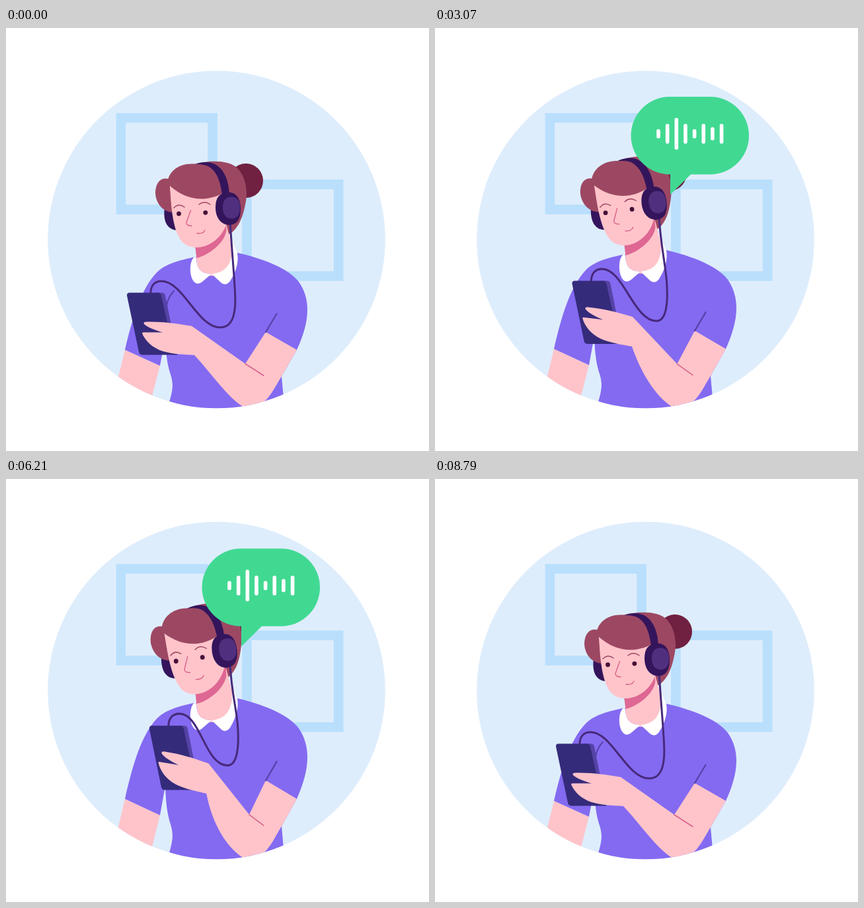
Animation of 640 by 640 pixels, one loop 9 s. Source, as an HTML page with a canvas:

```html
<!DOCTYPE html>
<html lang="en">
<head>
<meta charset="utf-8">
<title>Listening to a voice message</title>
<style>
  html, body { margin: 0; width: 100%; height: 100%; overflow: hidden; background: #fff; }
  canvas { display: block; width: 100vw; height: 100vh; }
</style>
</head>
<body>
<canvas id="stage" width="640" height="640"></canvas>
<script>
const ctx = document.getElementById('stage').getContext('2d');
const LOOP = 9000, FPS = 14, FLOOR = 574;

const C = {
  disc: '#deedfc', frame: '#b9dffd', hair: '#9d4863', bun: '#702040',
  band: '#34155c', cup: '#50307e', skin: '#ffc4ca', shade: '#de6793',
  shirt: '#846af1', fold: '#5a42ab', phone: '#352b7b', edge: '#5643a6',
  cable: '#47297b', line: '#d9608a', eye: '#451038', bubble: '#41d992'
};

// time, body lift, arm lift, cable x, head x, head y, head tilt, bubble top
const POSE = [
  [0,    0,   0,   324,  0,    0,    0,    94],
  [1710, 1,   1,   333, -4.5, -8.2, -6.6,  98],
  [3070, .45, .72, 335, -3.6, -3.2, -5,   104],
  [4500, 0,   .5,  335, -2.6,  1.3, -3,   109.5],
  [6210, .9,  1,   335, -4.4, -7.5, -5.7, 105],
  [7290, .55, .66, 328, -2.7, -5.7, -4,    99],
  [8400, 0,   0,   324,  0,    0,    0,    94.5]
];
const POP = [
  [400, 0], [965, 1.15], [1300, .97], [1710, .994], [2000, 1],
  [7650, 1], [8070, 1.085], [8360, .905], [8790, 0]
];

// full bar heights, and the moments a dip reaches the first bar
const BARS = [14, 30, 48, 30, 14, 30, 20, 30];
const DIPS = [1438, 4180, 6730];
const LAG = 80;

// smooth interpolation through the keys without overshoot
function track(keys, c, t) {
  const n = keys.length - 1;
  if (t <= keys[0][0]) return keys[0][c];
  if (t >= keys[n][0]) return keys[n][c];
  let i = 0;
  while (t >= keys[i + 1][0]) i++;
  const rise = j => (keys[j + 1][c] - keys[j][c]) / (keys[j + 1][0] - keys[j][0]);
  const slope = j => {
    if (j === 0 || j === n) return 0;
    const a = rise(j - 1), b = rise(j);
    return a * b > 0 ? 2 * a * b / (a + b) : 0;
  };
  const h = keys[i + 1][0] - keys[i][0], u = (t - keys[i][0]) / h;
  const w = u * u * (3 - 2 * u);
  return keys[i][c] * (1 - w) + keys[i + 1][c] * w +
    h * u * (1 - u) * (slope(i) * (1 - u) - slope(i + 1) * u);
}

function fill(d, color) {
  ctx.fillStyle = color;
  ctx.fill(new Path2D(d));
}

function stroke(d, color, width) {
  ctx.strokeStyle = color;
  ctx.lineWidth = width;
  ctx.lineCap = ctx.lineJoin = 'round';
  ctx.stroke(new Path2D(d));
}

function dot(x, y, r, color) {
  ctx.fillStyle = color;
  ctx.beginPath();
  ctx.arc(x, y, r, 0, 7);
  ctx.fill();
}

function pill(x, y, w, h, r, color) {
  ctx.fillStyle = color;
  ctx.beginPath();
  ctx.roundRect(x, y, w, h, r);
  ctx.fill();
}

function inBody(p, draw) {
  ctx.save();
  ctx.translate(0, FLOOR);
  ctx.scale(1, p.stretch);
  ctx.translate(0, -FLOOR);
  draw(p);
  ctx.restore();
}

function inHead(p, draw) {
  const x = 281.6, y = 280.2;
  ctx.save();
  ctx.translate(x + p.headX, y + p.headY);
  ctx.scale(1, p.stretch);
  ctx.rotate(p.tilt * Math.PI / 180);
  ctx.translate(-x, -y);
  draw();
  ctx.restore();
}

function room() {
  ctx.fillStyle = C.disc;
  ctx.fillRect(0, 0, 640, 640);
  ctx.strokeStyle = C.frame;
  ctx.lineWidth = 14.6;
  ctx.strokeRect(173.8, 136, 138.8, 138.6);
  ctx.strokeRect(364.4, 236.6, 138.8, 138.8);
}

function headBack() {
  dot(363, 231, 26, C.bun);
  fill('M286 206C306 200 338 199 351 213C362 225 366 245 363 262C359 285 352 306 334 314L325 285L300 230Z', C.hair);
  fill('M240 272C237 294 245 306 260 306L258 272Z', C.band);
}

function torso() {
  fill('M180 487L165 548L165 580L215 580L233 511Z', C.skin);
  fill('M288 346C260 352 241 357 228 370C205 394 192 436 180 487L233 511L241 468C242 498 245 512 249 524' +
    'C254 541 253 548 242 582L422 582L417 527L440 487C457 450 464 414 443 384C427 363 388 349 350 340Z', C.shirt);
  stroke('M254 398Q245 407 243 420', C.fold, 2.2);
  fill('M286 322L289 362L300 375L325 375L341 362L342 330L333 296Z', C.skin);
  fill('M285 322L288.5 348C308 343 331 325 333.5 306L332 292Z', C.shade);
  fill('M287 345C277 350 277 372 283 382Q289 391 298 383L311 372C300 372 291 368 289 357Z', C.shirt);
  fill('M287 345C277 350 277 372 283 382Q289 391 298 383L311 372C300 372 291 368 289 357Z', '#fff');
  fill('M311 372L324 384Q332 392 339 383C345 374 353 357 350 341L342 322C344 350 338 370 311 372Z', '#fff');
}

function cable(p) {
  const x = 183 + 34 * p.arm, y = 401 - 20.5 * p.arm;
  const sx = x + 36 - Math.min(7, 14 * p.arm), px = sx + 16.5, py = y - 18;
  const bx = p.cableX, by = 453 - 16.6 * p.lift, r = 347 + .4 * (bx - 324);
  stroke(`M${sx} ${y + 3}C${sx - 1} ${y - 12} ${px - 10} ${py} ${px} ${py}` +
    `C${px + 32} ${py} ${bx - 34} ${by} ${bx} ${by}` +
    `C${r - 1} ${by} ${r + 1} ${by - 28} ${r - .5} ${by - 53}` +
    `C${r - 2} ${by - 83} 342 340 338.5 286`, C.cable, 3);
}

function phone(p) {
  ctx.save();
  ctx.translate(34 * p.arm, -20.5 * p.arm);
  fill('M225 400.5L236 400.5Q240 400.5 241 405L259 494L240 494Z', C.edge);
  fill('M187 400.5L230 400.5Q234 400.5 235 405L254 490L260 494.5L207 494.5Q202 494.5 201 490L183 405Q182.500 400.500 187 400.5Z', C.phone);
  ctx.restore();
}

function arm(p) {
  const k = p.arm, cos = Math.cos(.16 * k), sin = Math.sin(.16 * k);
  // swing a point around the elbow
  const h = (x, y) => {
    const u = x - 390, v = y - 570;
    return `${390 + u * cos - v * sin + 5 * k} ${570 + u * sin + v * cos} `;
  };
  const crook = `${362 + 6 * k} ${508 + 2 * k}`;
  fill(`M393 460L440 487L417 527C407 543 401 556 391 565C382 573 368 578 357 572C334 557 312 524 ${h(285, 495)}` +
    `C${h(268, 494)}${h(250, 493)}${h(237, 489)}C${h(222, 484)}${h(211, 474)}${h(206, 462)}` +
    `Q${h(206, 460)}${h(209, 460.5)}L${h(237, 460.5)}C${h(225, 457)}${h(214, 453)}${h(209, 448)}` +
    `Q${h(207, 444.5)}${h(213, 444.5)}C${h(236, 444)}${h(258, 447)}${h(281, 451)}L${crook}Z`, C.skin);
  stroke(`M${crook}L390 526`, C.line, 1.5);
  stroke('M409.500 432.5L393 460', C.fold, 2.4);
}

function headFront() {
  fill('M248 229C233 224 226 236 226 250C227 267 239 279 253 279L262 250Z', C.hair);
  fill('M247.500 234L249 255C251 285 255 304 262 317C268 328 278 332 289 332C311 331 327 315 333 298L336 250L318 236Z', C.skin);
  fill('M248 239L244 238C244 218 260 205.500 281 205.500C303 205.500 320 215 327 236L328 250C302 264 273 261 248 239Z', C.hair);
  fill('M286 206C296 202 308 202 316 206C331 214 337.500 232 338 254L327 254C325 236 321 220 309 211C303 207 296 206 286 206Z', C.band);
  fill('M336 248.500C350 248.500 355 260 355 274C355 290 349 298 337 298C324 297 317 286 317 271C317 257 323 249 336 248.500Z', C.band);
  fill('M341 255.500C350 255.500 354 262 354 271C354 282 350 288.500 341 288.500C332 288 328 281 328 271C328 261 333 255.500 341 255.500Z', C.cup);
  stroke('M254 272Q261.500 264.500 270 271', C.hair, 1.5);
  stroke('M292 267Q300 260.500 309 267', C.hair, 1.5);
  stroke('M279.500 276L273 294Q272 299 281 299.500', C.line, 1.4);
  stroke('M289 310.500Q298 312 301 306', C.line, 1.4);
  dot(261.5, 281, 3.4, C.eye);
  dot(301.8, 279.3, 3.4, C.eye);
}

function barHeight(i, t) {
  let level = 1;
  for (const start of DIPS) {
    const d = Math.abs((t - start) / LAG - i);
    if (d < 4) level = Math.min(level, (1 - Math.cos(Math.PI * d / 4)) / 2);
  }
  return Math.max(5.6, BARS[i] * level);
}

function bubble(p, t) {
  const size = track(POP, 1, t);
  if (size < .005) return;
  ctx.save();
  ctx.translate(356, p.bubbleY + 148);
  ctx.scale(size, size);
  pill(-59.5, -148, 178.5, 117.5, 58.75, C.bubble);
  fill('M0 -40L0 0L31 -30.500L31 -40Z', C.bubble);
  BARS.forEach((_, i) => {
    const h = barHeight(i, t);
    pill(-20.8 + 13.65 * i, -92 - h / 2, 5.6, h, 2.8, '#fff');
  });
  ctx.restore();
}

function pose(t) {
  const [lift, arm, cableX, headX, headY, tilt, bubbleY] =
    [1, 2, 3, 4, 5, 6, 7].map(c => track(POSE, c, t));
  return { lift, arm, cableX, headX, headY, tilt, bubbleY, stretch: 1 + .039 * lift };
}

function render(t) {
  const p = pose(t);
  ctx.fillStyle = '#fff';
  ctx.fillRect(0, 0, 640, 640);
  ctx.save();
  ctx.beginPath();
  ctx.arc(318.5, 320, 255.3, 0, 7);
  ctx.clip();
  room();
  inHead(p, headBack);
  inBody(p, () => [torso, cable, phone, arm].forEach(part => part(p)));
  inHead(p, headFront);
  ctx.restore();
  bubble(p, t);
}

function tick() {
  const t = performance.now() % LOOP;
  render(Math.floor((t + 2) * FPS / 1000) * 1000 / FPS);
  requestAnimationFrame(tick);
}
tick();
</script>
</body>
</html>
```
